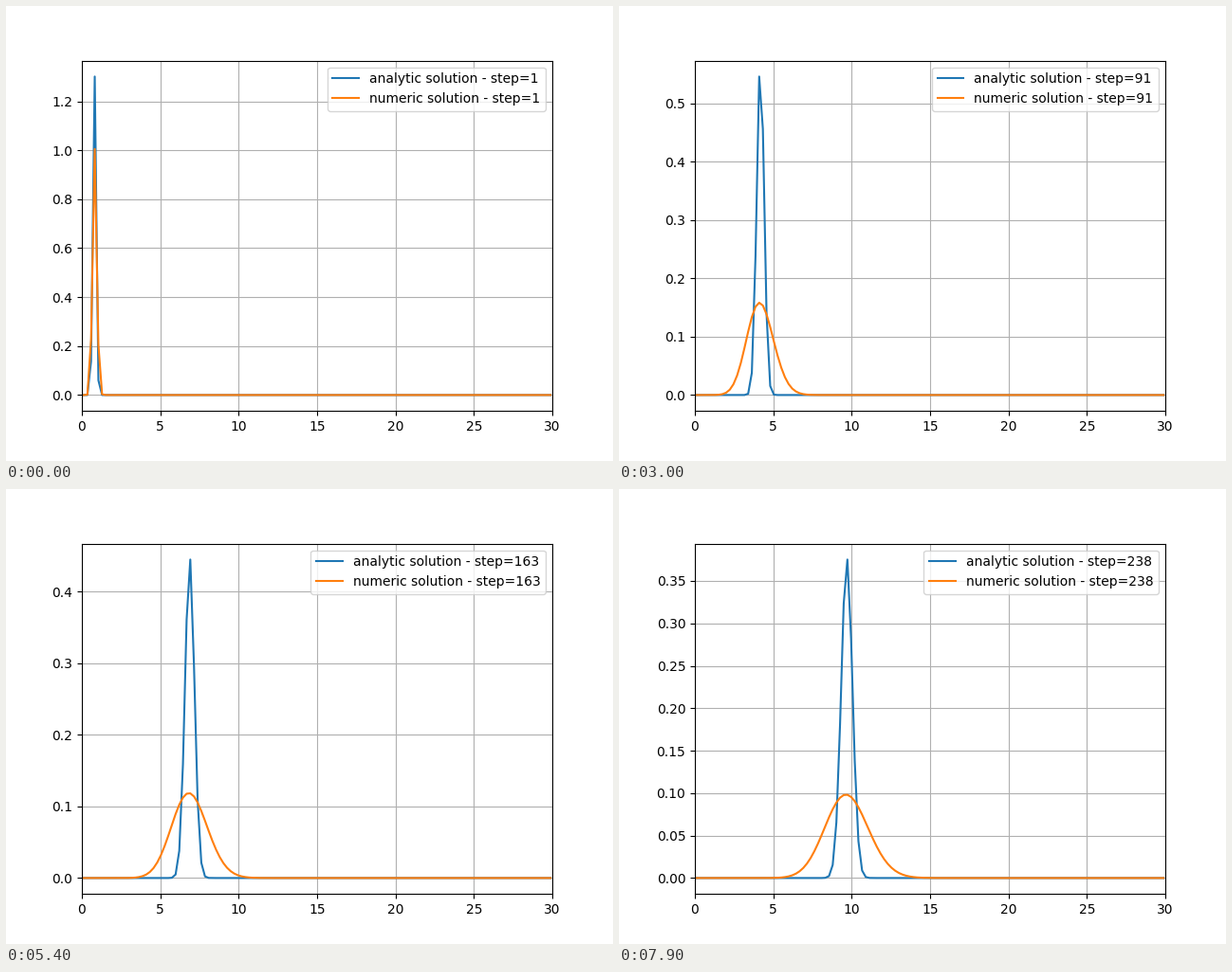
A matplotlib script for the animation above (8 s loop, 640 by 480 pixels).

```python
import numpy as np
import matplotlib.pyplot as plt
from matplotlib.animation import FuncAnimation

FRAMES, INTERVAL, STRIDE = 80, 100, 3
LENGTH, CELLS = 30, 128
DX = LENGTH / CELLS
COURANT = 0.16            # velocity * dt / dx
SHIFT = COURANT * DX      # distance travelled per step
SPREAD = 0.0131           # variance gained per unit of distance
HEIGHT = 1.1735
START_STEP, START_X = 20, 0.0145

x = (np.arange(CELLS) + 0.5) * DX


def analytic(step):
    """Drifting, spreading pulse of constant mass."""
    dist = SHIFT * (step + START_STEP)
    return HEIGHT / np.sqrt(dist) * np.exp(
        -(x - START_X - dist) ** 2 / (2 * SPREAD * dist))


def solve(steps):
    """Explicit upwind advection with central diffusion."""
    r = SPREAD * SHIFT / (2 * DX ** 2)
    c = analytic(0)
    states = [c]
    for _ in range(steps):
        left = np.append(0, c[:-1])
        right = np.append(c[1:], c[-1])
        c = c - COURANT * (c - left) + r * (left - 2 * c + right)
        states.append(c)
    return states


numeric = solve(1 + STRIDE * (FRAMES - 1))

fig, ax = plt.subplots(figsize=(6.4, 4.8), dpi=100)


def draw(frame):
    step = 1 + STRIDE * frame
    ax.clear()
    ax.plot(x, analytic(step), label=f"analytic solution - step={step}")
    ax.plot(x, numeric[step], label=f"numeric solution - step={step}")
    ax.set_xlim(0, LENGTH)
    ax.grid(True)
    ax.legend(loc="upper right")


anim = FuncAnimation(fig, draw, frames=FRAMES, init_func=lambda: None,
                     interval=INTERVAL, repeat=True, repeat_delay=0)
plt.show()
```
